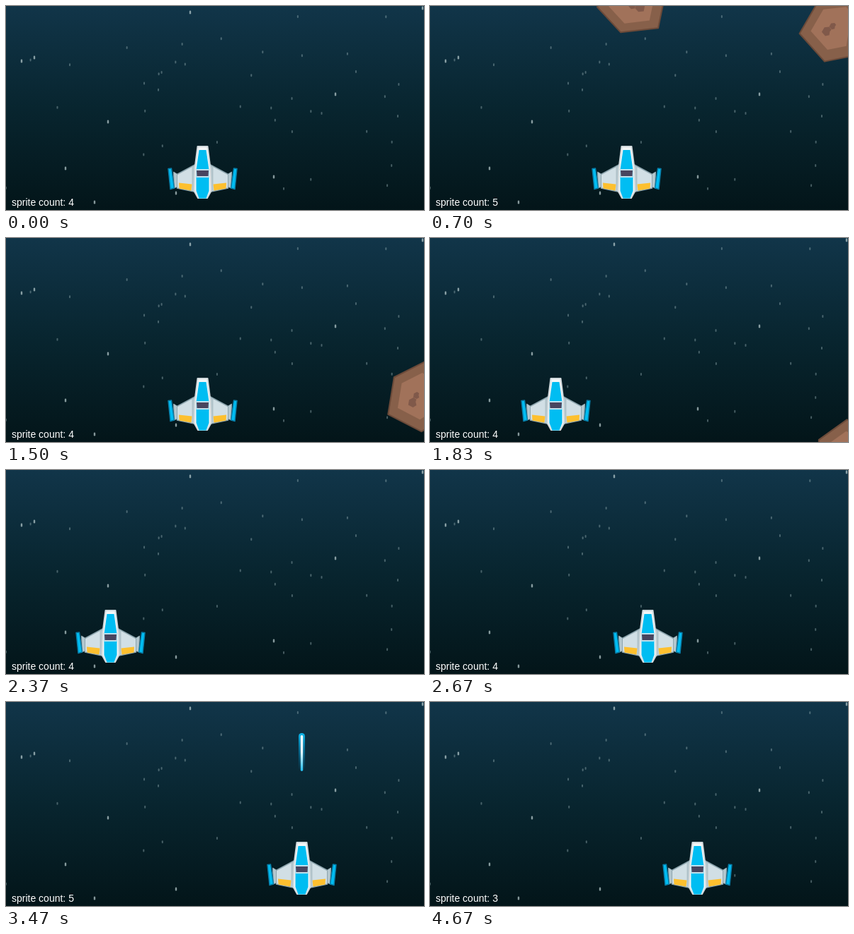
Recreate the animation shown at these times as an HTML page with a canvas. Size 590 by 289 pixels, loop 4.73 s.

```html
<!DOCTYPE html>
<html lang="en">
<head>
<meta charset="utf-8">
<title>Space shooter</title>
<style>
html, body { margin: 0; width: 100%; height: 100%; overflow: hidden; background: #031519; }
canvas { display: block; }
</style>
</head>
<body>
<canvas id="stage" width="590" height="289"></canvas>
<script>
const ctx = document.getElementById('stage').getContext('2d');
const LOOP = 4730, SHOT_LIFE = 165, HIT = 1470;

const brightStars = [[260, 9], [588, 3], [40, 73], [22, 78], [465, 125], [144, 164], [84, 230],
  [378, 242], [240, 265], [125, 278]];
const rock = [-26,-45, -3,-34, 33,-36, 49,2, 17,45, -34,28, -49,-19];
const moves = [[1635, -150], [2330, 260], [2890, 70], [3100, -40], [3500, -40]]; // start, distance
const shots = [1237, 1435, 2040, 3283, 3386, 3650];
const births = [300, 4030, 4500], deaths = [HIT, 3600, 3830, 4670];

let seed = 7;
function random() {
  seed = (seed * 16807) % 2147483647;
  return seed / 2147483647;
}
const dimStars = Array.from({ length: 40 }, () => [random() * 590, random() * 280]);

function poly(points, fill, stroke, width = 1.5) {
  ctx.beginPath();
  for (let i = 0; i < points.length; i += 2) ctx.lineTo(points[i], points[i + 1]);
  ctx.closePath();
  ctx.fillStyle = fill;
  ctx.fill();
  if (!stroke) return;
  ctx.strokeStyle = stroke;
  ctx.lineWidth = width;
  ctx.lineJoin = 'round';
  ctx.stroke();
}

function bar(x, y, w, h, fill) {
  ctx.fillStyle = fill;
  ctx.beginPath();
  ctx.roundRect(x - w / 2, y, w, h, w / 2);
  ctx.fill();
}

function fade(y0, y1, ...colors) {
  const g = ctx.createLinearGradient(0, y0, 0, y1);
  colors.forEach((c, i) => g.addColorStop(i / (colors.length - 1), c));
  return g;
}

function background() {
  ctx.fillStyle = fade(0, 289, '#113549', '#08252f', '#031519');
  ctx.fillRect(0, 0, 590, 289);
  for (const [x, y] of dimStars) bar(x, y - 2, 2, 4, 'rgba(150,175,180,.45)');
  for (const [x, y] of brightStars) bar(x, y - 2.5, 2.4, 5, 'rgba(190,208,210,.7)');
}

function meteor(x, y, deg) {
  const part = (scale, dx, dy, ...paint) =>
    poly(rock.map((v, i) => v * scale + (i % 2 ? dy : dx)), ...paint);
  ctx.save();
  ctx.translate(x, y);
  ctx.rotate(deg * Math.PI / 180);
  part(.99, 0, 0, '#87604a', '#6b4a39', 2);
  part(.66, -1, 0, '#a1725a');
  part(.1, -3, 1, '#80594a');
  part(.14, 6, 8, '#80594a');
  ctx.restore();
}

function laser(x, top) {
  bar(x, top, 9, 53, fade(top, top + 54, '#10b8ec', 'rgba(0,140,190,.6)', 'rgba(0,120,170,0)'));
  bar(x, top + 3, 3.4, 51, fade(top, top + 54, '#fff', '#e8f8ff', '#1cbdf0'));
}

function wing(side) {
  ctx.save();
  ctx.scale(side, 1);
  poly([-11,225, -37,239, -36,258, -12,263], '#d1dfe5', '#8da5ae');
  poly([-15,228, -11,226, -11,262, -15,261], '#b1c3ca');
  poly([-41,235, -36,238, -36,256, -40,258], '#b5c8cf', '#8da5ae', 1);
  poly([-33.5,250.5, -15,252.5, -16,261.5, -33,258.5], '#fdc02f');
  poly([-48.5,230.5, -44,230, -40,258, -45.5,259.5], '#00bdf2', '#087ca6');
  ctx.restore();
}

function ship(x) {
  ctx.save();
  ctx.translate(x, 0);
  wing(1);
  wing(-1);
  poly([-7,199, 7,199, 11,230, 12,262, 6.5,272, -6.5,272, -12,262, -11,230], '#f3f6f7', '#d2dadd', 2);
  poly([-5,204, 5,204, 9,232, 9,262, 5,272.5, -5,272.5, -9,262, -9,232], '#00bdf2');
  poly([-9.5,231, 9.5,231, 9,243, -9,243], '#bfe0ec');
  poly([-8.5,233, 8.5,233, 8,241, -8,241], '#48455f');
  ctx.restore();
}

// Each move runs at a steady speed, in steps of 10 px
function shipX(t) {
  let x = 270;
  for (const [start, dist] of moves) {
    x += Math.sign(dist) * Math.min(Math.abs(dist), Math.max(0, t - start) * .52);
  }
  return Math.round(x / 10) * 10 + 7.5;
}

function draw(t) {
  // The game stalls briefly between 800 and 930 ms
  const d = (t < 930 ? Math.min(t, 800) + 29 : t) - 1270;
  const past = list => list.filter(at => at <= t).length;
  const flying = shots.filter(at => t >= at && t < at + SHOT_LIFE && !(at < HIT && t >= HIT));

  background();
  if (t >= 300 && t < HIT) meteor(250 - .0702 * d, 62 + .1183 * d, .0462 * d);
  if (t >= 300 && t < 2030) meteor(577 + .0155 * d, 168 + .2523 * d, 87 - .027 * d);
  for (const at of flying) laser(shipX(at), 144 - 20 * Math.round((t - at) * .06));
  ship(shipX(t));

  ctx.font = '14px "Liberation Sans", Arial, sans-serif';
  ctx.fillStyle = '#fff';
  ctx.fillText(`sprite count: ${4 + past(births) - past(deaths) + flying.length}`, 8, 283);
}

let began;
function tick(now) {
  began ??= now;
  draw(Math.max(0, now - began) % LOOP);
  requestAnimationFrame(tick);
}
draw(0);
requestAnimationFrame(tick);
</script>
</body>
</html>
```
